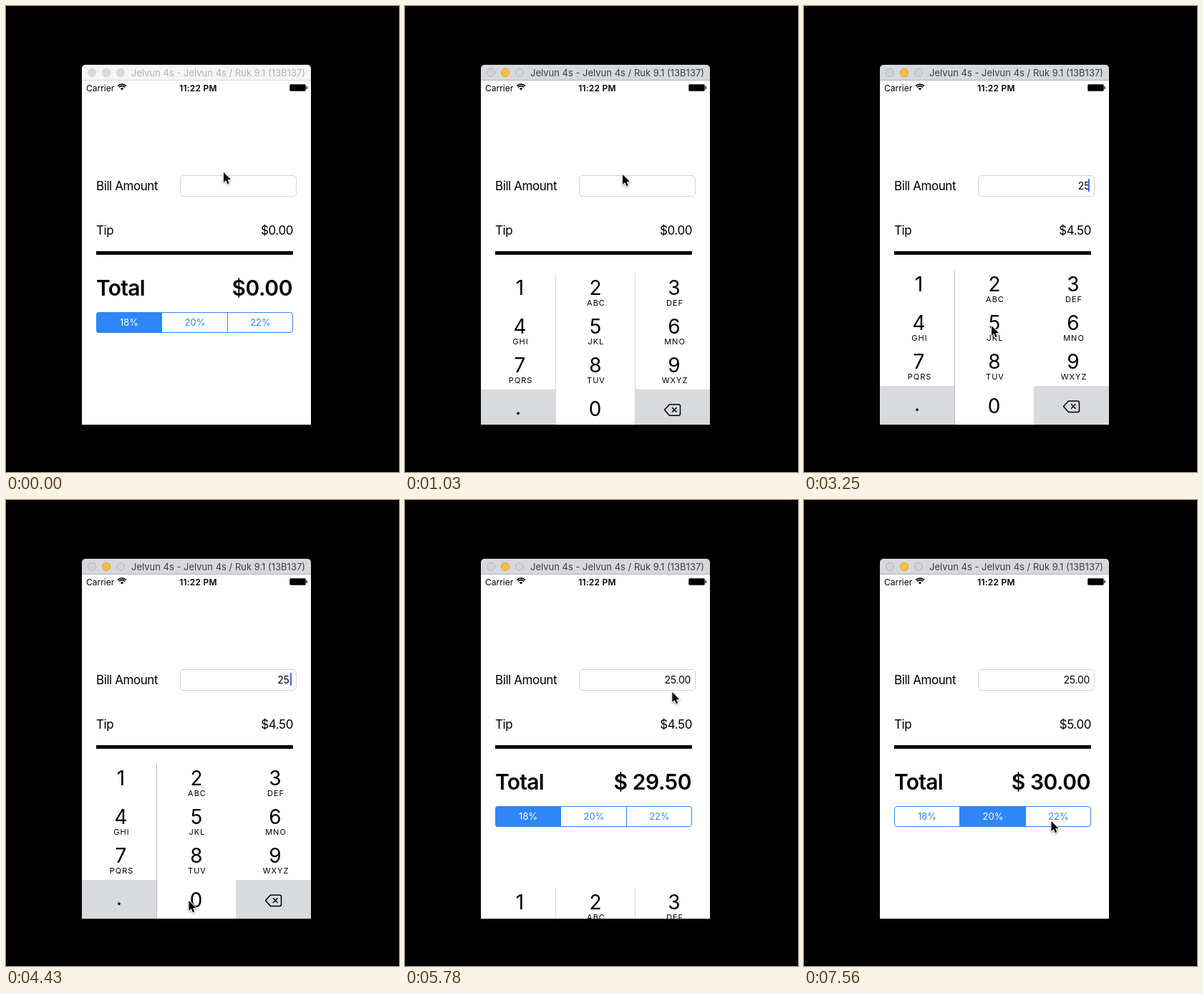
Animation of 549x650 px, one loop 8 s. Source, as an HTML page with a canvas:

```html
<!DOCTYPE html>
<html>
<head>
<meta charset="utf-8">
<title>Tip calculator</title>
<style>
  html, body { margin: 0; height: 100%; overflow: hidden; background: #000; }
  canvas { display: block; }
</style>
</head>
<body>
<canvas id="stage" width="549" height="650"></canvas>
<script>
const ctx = document.getElementById('stage').getContext('2d');
const LOOP = 8000;
const BLUE = '#2f86f9';
const KEY_GRAY = '#d8dade';

// Pointer stops: time, x, y
const route = [
  [0, 304, 232], [500, 304, 232], [590, 304, 235], [1450, 304, 235],
  [1640, 255, 330], [1900, 170, 382], [2210, 170, 382], [2360, 223.5, 382],
  [2600, 262, 386], [2800, 262, 386], [3150, 262, 446], [3390, 262, 446],
  [3850, 159, 565], [4050, 159, 565], [4400, 255.5, 559], [4800, 255.5, 559],
  [5300, 318, 194.5], [5630, 318, 194.5], [6080, 529, 475], [6380, 529, 475],
  [6530, 434.5, 467], [6900, 255, 440], [7150, 255, 440], [7540, 345.5, 448],
  [LOOP, 345.5, 448]
];

// Key presses: time, field text, tip
const entries = [
  [0, '', '$0.00'], [2700, '2', '$0.36'], [3250, '25', '$4.50'],
  [4050, '25.', '$4.50'], [4500, '25.0', '$4.50'], [4750, '25.00', '$4.50'],
  [7050, '25.00', '$5.00']
];

const clamp = v => Math.min(1, Math.max(0, v));
const easeOut = p => 1 - (1 - clamp(p)) ** 2;
const smooth = p => p * p * (3 - 2 * p);

function text(str, x, y, size, { weight = 400, align = 'left', color = '#000', track = 0 } = {}) {
  ctx.font = `${weight} ${size}px Inter, "Liberation Sans", sans-serif`;
  ctx.letterSpacing = track * size + 'px';
  ctx.textAlign = align;
  ctx.fillStyle = color;
  ctx.fillText(str, x, y);
}

function rect(x, y, w, h, color) {
  ctx.fillStyle = color;
  ctx.fillRect(x, y, w, h);
}

function roundRect(x, y, w, h, r, fill, stroke) {
  ctx.beginPath();
  ctx.roundRect(x, y, w, h, r);
  paint(fill, stroke);
}

function paint(fill, stroke, width = 1) {
  ctx.lineWidth = width;
  if (fill) { ctx.fillStyle = fill; ctx.fill(); }
  if (stroke) { ctx.strokeStyle = stroke; ctx.stroke(); }
}

function titleBar(active) {
  roundRect(106, 82, 320, 22, [5, 5, 0, 0], active ? '#d6d8dc' : '#f5f5f5');
  rect(106, 103, 320, 1, active ? '#b3b4b8' : '#d6d6d6');
  for (let i = 0; i < 3; i++) {
    ctx.beginPath();
    ctx.arc(120 + i * 20, 93, active ? 5.6 : 6.2, 0, 7);
    if (!active) paint('#d9d9dd');
    else if (i === 1) paint('#fdbc40', '#dda337');
    else paint('#d1d3d7', '#b4b6ba');
  }
  text('Jelvun 4s - Jelvun 4s / Ruk 9.1 (13B137)', 296.5, 98, 13,
    { align: 'center', color: active ? '#3d3e41' : '#b1b1b1' });
}

function statusBar() {
  text('Carrier', 112, 118.5, 12);
  text('11:22 PM', 268.5, 118.5, 12, { weight: 600, align: 'center', track: 0.02 });
  for (const r of [3.2, 5.8, 8.4]) {
    ctx.beginPath();
    ctx.arc(162, 117.5, r, -Math.PI * 0.75, -Math.PI * 0.25);
    if (r < 4) ctx.lineTo(162, 117.5);
    paint(r < 4 && '#000', r > 4 && '#000', 1.7);
  }
  roundRect(396.5, 109.5, 22, 9, 1.5, '#000', '#444');
  rect(419.5, 112, 1.5, 4, '#222');
}

function form(entry, caret) {
  text('Bill Amount', 126, 256.5, 17, { track: -0.025 });
  roundRect(243.5, 236.5, 162, 29, 4.5, '#fff', '#d3d3d3');
  text(entry[1], 399, 255.5, 14, { align: 'right', track: -0.02 });
  ctx.globalAlpha = caret;
  rect(397, 241, 2, 18, '#436edb');
  ctx.globalAlpha = 1;
  text('Tip', 126, 318.5, 17, { track: -0.025 });
  text(entry[2], 401, 318.5, 17, { align: 'right', track: -0.025 });
  rect(126, 342, 275, 5, '#000');
}

function totals(total, selected) {
  text('Total', 126, 404, 30, { weight: 600, track: -0.025 });
  text(total, 400, 404, 30, { weight: 600, align: 'right', track: -0.015 });
  const edges = [126, 217.5, 309.5, 401];
  ctx.save();
  ctx.beginPath();
  ctx.roundRect(126, 427, 275, 29, 4);
  ctx.clip();
  rect(edges[selected], 427, edges[selected + 1] - edges[selected], 29, BLUE);
  rect(217, 427, 1, 29, BLUE);
  rect(309, 427, 1, 29, BLUE);
  ctx.restore();
  roundRect(126.5, 427.5, 274, 28, 3.5, null, BLUE);
  ['18%', '20%', '22%'].forEach((label, i) =>
    text(label, [172, 264, 355.5][i], 446, 13,
      { align: 'center', color: i === selected ? '#fff' : BLUE }));
}

function keypad(offset) {
  const columns = [160.5, 266, 376];
  const letters = ['', 'ABC', 'DEF', 'GHI', 'JKL', 'MNO', 'PQRS', 'TUV', 'WXYZ'];
  ctx.save();
  ctx.beginPath();
  ctx.rect(106, 104, 320, 480);
  ctx.clip();
  ctx.translate(0, offset);
  rect(106, 368, 320, 216, '#fff');
  rect(106, 530, 104, 54, KEY_GRAY);
  rect(321, 530, 105, 54, KEY_GRAY);
  const moving = offset > 0.5;
  rect(210, 368, 1, 216, moving ? KEY_GRAY : '#b4bac6');
  if (moving) rect(321, 368, 1, 216, KEY_GRAY);
  letters.forEach((label, i) => {
    const x = columns[i % 3], y = 398 + 54 * Math.floor(i / 3);
    text(i + 1, x, y, 28, { align: 'center' });
    text(label, x + 1, y + 15, 11, { align: 'center', track: 0.09 });
  });
  text('.', 158, 565, 28, { align: 'center' });
  text('0', 265.5, 567.5, 28, { align: 'center' });
  // Backspace
  ctx.lineJoin = 'round';
  ctx.beginPath();
  ctx.moveTo(362.5, 558.5);
  ctx.lineTo(369.5, 551);
  ctx.arcTo(384.5, 551, 384.5, 558, 2.5);
  ctx.arcTo(384.5, 566.5, 378, 566.5, 2.5);
  ctx.lineTo(369.5, 566.5);
  ctx.closePath();
  ctx.moveTo(373, 555.3); ctx.lineTo(379.5, 561.8);
  ctx.moveTo(379.5, 555.3); ctx.lineTo(373, 561.8);
  paint(null, '#000', 1.5);
  ctx.restore();
}

function pointer(t) {
  const i = route.findIndex(stop => stop[0] > t);
  const [t0, x0, y0] = route[i - 1], [t1, x1, y1] = route[i];
  const p = smooth((t - t0) / (t1 - t0));
  ctx.save();
  ctx.translate(x0 + (x1 - x0) * p, y0 + (y1 - y0) * p);
  ctx.beginPath();
  [[0, 0], [0, 14], [3.2, 11], [5.5, 16.3], [7.8, 15.3], [5.6, 10.2], [10, 10]]
    .forEach(point => ctx.lineTo(...point));
  ctx.closePath();
  ctx.lineJoin = 'round';
  ctx.shadowColor = 'rgba(0,0,0,.4)';
  ctx.shadowBlur = 3;
  ctx.shadowOffsetY = 1;
  paint(null, '#fff', 2);
  ctx.shadowColor = 'transparent';
  paint('#000');
  ctx.restore();
}

function caretAlpha(t, lastKey) {
  if (t < 1635 || t > 5560) return 0;
  const phase = (t - (lastKey || 785)) % 1000;
  return phase < 850 ? 1 - clamp((phase - 500) / 150) : (phase - 850) / 150;
}

function draw(t) {
  const entry = entries.findLast(e => e[0] <= t);
  const switched = t >= 7050;
  const total = t < 2700 ? '$0.00' : switched ? '$ 30.00' : '$ 29.50';
  const shown = easeOut((t - 690) / 400) - easeOut((t - 5560) / 400);
  rect(0, 0, 549, 650, '#000');
  rect(106, 104, 320, 480, '#fff');
  titleBar(t >= 150);
  statusBar();
  form(entry, caretAlpha(t, entry[0]));
  totals(total, switched ? 1 : 0);
  if (shown > 0) keypad(216 * (1 - shown));
  pointer(t);
}

function tick() {
  draw(performance.now() % LOOP);
  requestAnimationFrame(tick);
}
tick();
</script>
</body>
</html>
```
